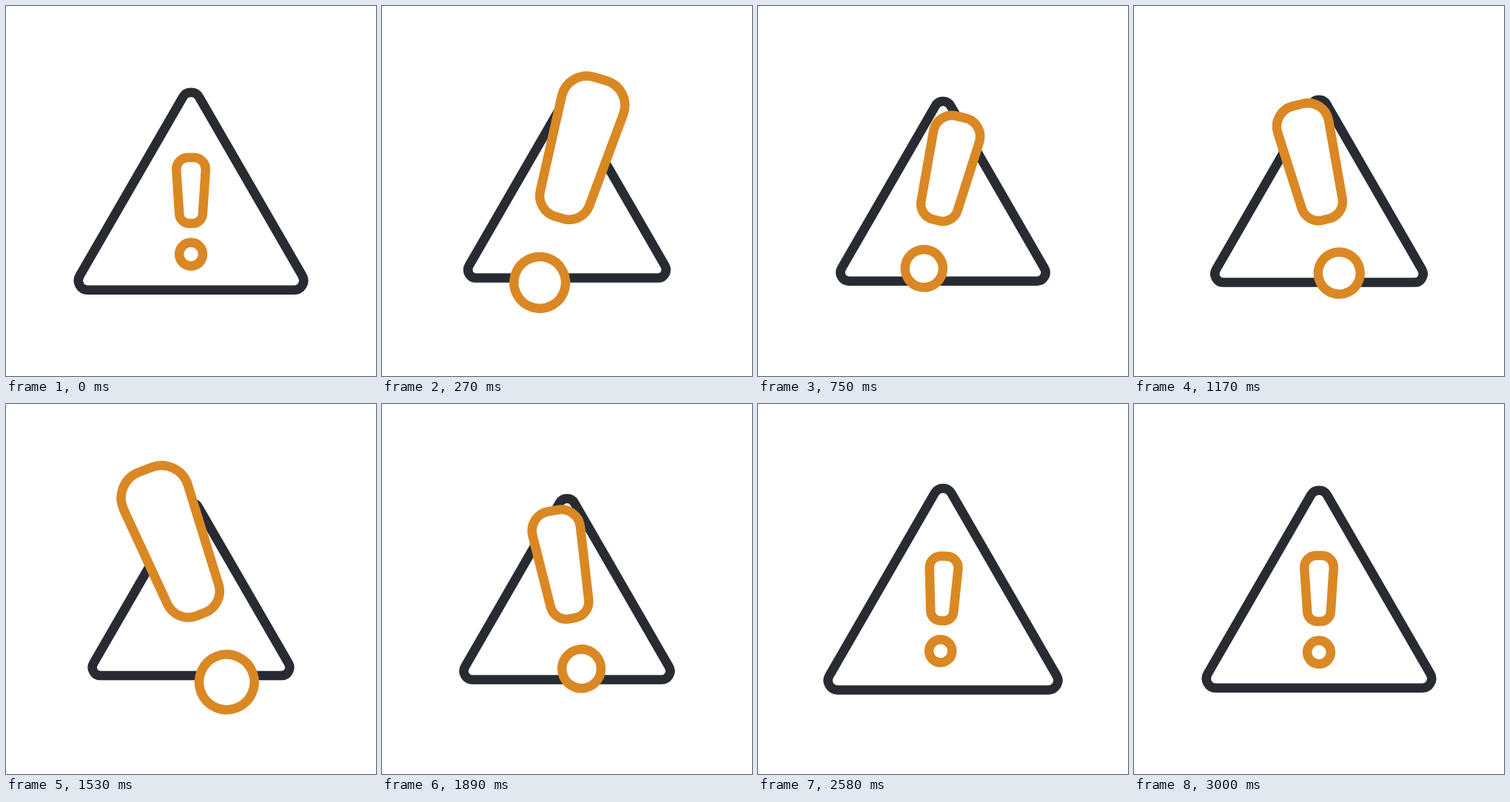
An HTML page for the animation above (3.06 s loop, 500 by 500 pixels).

```html
<!DOCTYPE html>
<html lang="en">
<head>
<meta charset="utf-8">
<title>Warning</title>
<style>
  html, body { margin: 0; width: 100%; height: 100%; overflow: hidden; background: #fff; }
  svg { display: block; width: 100%; height: 100%; }
  path, circle { fill: #fff; stroke-width: 12.5; vector-effect: non-scaling-stroke; }
  #triangle { stroke: #282b32; }
  #mark { stroke: #da8824; }
</style>
</head>
<body>
<svg viewBox="0 0 500 500">
  <path id="triangle"/>
  <g id="mark">
    <path id="bar"/>
    <circle cy="85.5" r="15.9"/>
  </g>
</svg>
<script>
const LOOP = 3060, STEP = 30, LAST = 3000;
const el = id => document.getElementById(id);

// Outline around circles [x, y, r], listed clockwise.
function hull(circles) {
  const sides = circles.map(([ax, ay, r], i) => {
    const [bx, by, br] = circles[(i + 1) % circles.length];
    const dx = bx - ax, dy = by - ay;
    const normal = Math.atan2(dy, dx) - Math.acos((r - br) / Math.hypot(dx, dy));
    const nx = Math.cos(normal), ny = Math.sin(normal);
    return { r, from: `${ax + r * nx} ${ay + r * ny}`, to: `${bx + br * nx} ${by + br * ny}` };
  });
  const arc = ({ r, from }) => `A${r} ${r} 0 0 1 ${from}`;
  const [first, ...rest] = sides;
  return `M${first.from}L${first.to}` + rest.map(s => `${arc(s)}L${s.to}`).join('') + arc(first) + 'Z';
}

// A trapezium of circles, symmetric about x = 0.
const rounded = (topX, topY, topR, bottomX, bottomY, bottomR) => hull([
  [-topX, topY, topR], [topX, topY, topR], [bottomX, bottomY, bottomR], [-bottomX, bottomY, bottomR]]);

const easeOut = u => u * (2 - u);
const easeInOut = u => (1 - Math.cos(Math.PI * u)) / 2;

// Leaves rest quickly, then swings smoothly from one turning point [time, value] to the next.
function swing(rest, ...turns) {
  return time => {
    let [t0, v0] = [0, rest], ease = easeOut;
    for (const [t1, v1] of turns) {
      if (time < t1) return v0 + (v1 - v0) * ease((time - t0) / (t1 - t0));
      [t0, v0, ease] = [t1, v1, easeInOut];
    }
    return v0;
  };
}

const frameScale = swing(1, [420, .862], [970, .936], [1750, .862], [2210, 1.118], [2720, 1]);
const markScale = swing(1, [420, 2.37], [870, 1.46], [1600, 2.37], [2190, .91], [2750, 1]);
const tilt = swing(0, [500, 21], [1420, -21], [1540, -21], [2330, 5], [2800, 0]);
const lift = scale => -49 * Math.max(0, scale - 1);

el('triangle').setAttribute('d', hull([[0, -120.6, 12.7], [139.5, 121, 12.7], [-139.5, 121, 12.7]]));
el('bar').setAttribute('d', rounded(4, -29.5, 15.8, 2.6, 30.5, 13.2));

function draw(time) {
  const t = Math.min(LAST, Math.floor(time / STEP) * STEP);
  const scale = markScale(t);
  el('triangle').setAttribute('transform', `translate(250 250) scale(${frameScale(t)})`);
  el('mark').setAttribute('transform',
    `translate(250 250) rotate(${tilt(t)}) translate(0 ${lift(scale)}) scale(${scale})`);
}

let start;
function tick(now) {
  start ??= now;
  draw((now - start) % LOOP);
  requestAnimationFrame(tick);
}
draw(0);
requestAnimationFrame(tick);
</script>
</body>
</html>
```
